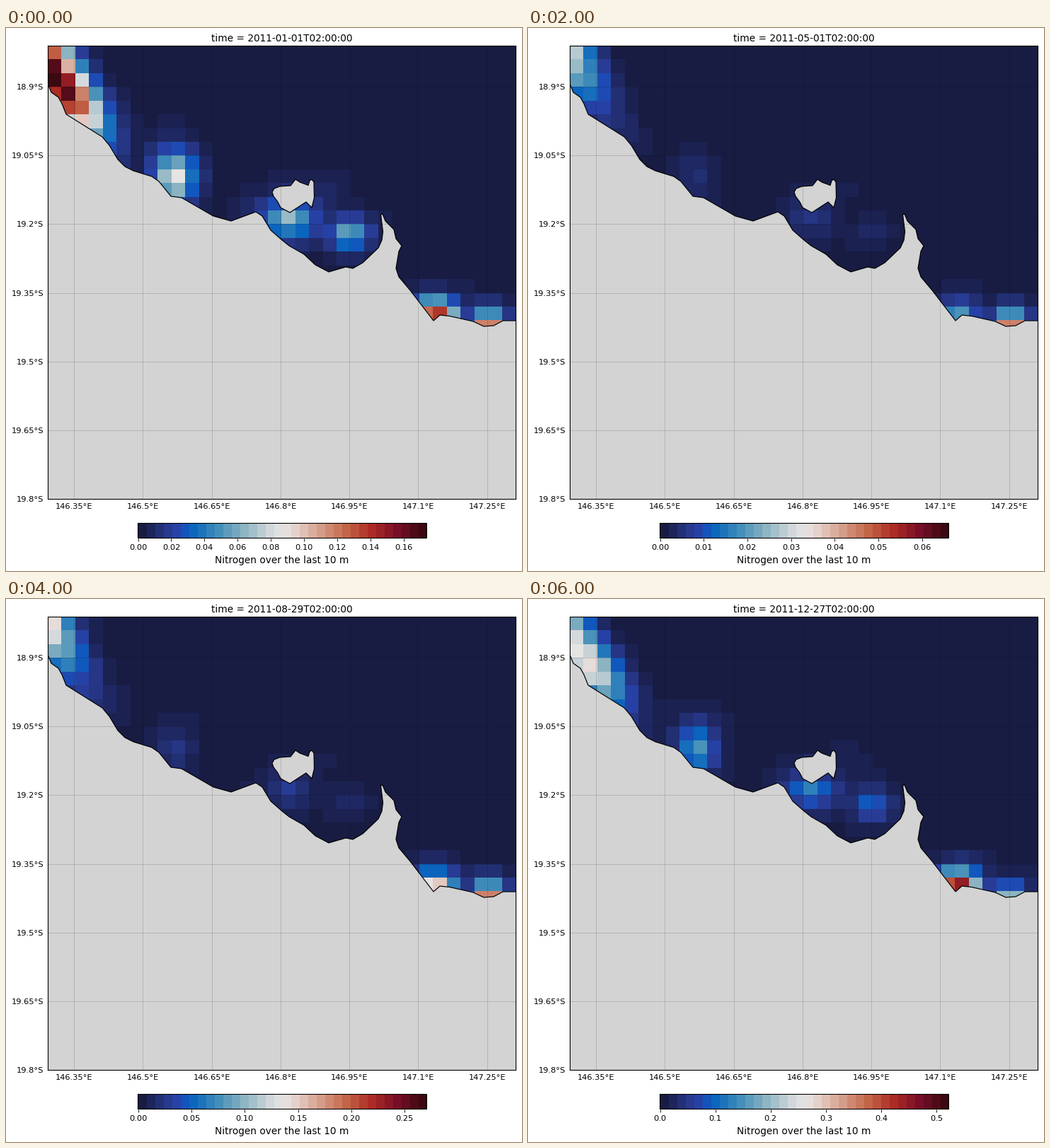
A matplotlib script that plays this animation: 729x768 px, repeating every 6.5 s.

```python
import numpy as np
import matplotlib.pyplot as plt
from matplotlib.animation import FuncAnimation
from matplotlib.colors import LinearSegmentedColormap
from matplotlib.patches import Polygon
from matplotlib.ticker import MaxNLocator

W, H, DPI = 729, 768, 96
LEFT, RIGHT, TOP, BOTTOM = 59.5, 720.5, 25.5, 666.5
ROWS, COLS = 33, 34
FRAMES, INTERVAL = 13, 500
START = np.datetime64("2011-01-01T02:00:00")

plt.rcParams["font.family"] = "DejaVu Sans"

# Diverging colour scale, positions in elevenths
STOPS = {
    0: "#181c42", 1: "#293a8f", 1.4: "#2644ac", 1.7: "#1256be", 2: "#0b66bd",
    3: "#4590b9", 4: "#8eb5c2", 5: "#d2d8db", 5.5: "#e6e5e4", 6: "#e6d2cc",
    7: "#d59d89", 8: "#c46548", 9: "#ac2b24", 10: "#780e28", 11: "#3c0911",
}
cmap = LinearSegmentedColormap.from_list(
    "balance", [(p / 11, color) for p, color in STOPS.items()], N=512)

# Outlines in stage pixels
COAST = [
    (59.5, 80), (64, 91), (74, 98), (79, 107), (85, 122), (136, 154),
    (146, 166), (158, 186), (168, 196), (180, 202), (206, 210), (216, 217),
    (233, 238), (248, 240), (293, 266), (318, 273), (353, 260), (362, 266),
    (374, 286), (390, 300), (400, 308), (421, 320), (437, 335), (456, 345),
    (480, 338), (490, 340), (504, 332), (526, 311), (531, 300), (532.5, 288),
    (529.5, 264), (532, 263), (536, 273), (548, 285), (551, 298), (559, 308),
    (555, 316), (551, 340), (555, 352), (571, 371), (604, 414), (613, 406),
    (627, 407.5), (660, 415), (675, 422), (689, 421), (702, 414), (720.5, 414),
]
ISLAND = [
    (376, 232), (379, 227), (387, 224), (402, 223), (409, 214), (415, 218),
    (427, 222.5), (429, 216), (432, 214), (435, 218), (435.5, 240), (432, 254),
    (424, 246), (401, 261), (388, 254), (384, 246), (378, 238),
]


def bump(step, peak, width):
    return np.exp(-((step - peak) / width) ** 2)


def fade(step):
    """Flush after January that dies away."""
    return np.exp(-0.8 * step)


def wet(step):
    """January flush plus the return of the rains late in the year."""
    return 1.5 * fade(step) + 0.85 * bump(step, 11.3, 2.2)


def shore(step):
    return 1 - 0.46 * (max(step - 8, 0) / 4) ** 1.5


def mouth(step):
    return 0.3 + 0.65 * fade(step) + 0.7 / (1 + np.exp(-2 * (step - 8)))


def north(step):
    level = 0.95 + 0.8 * fade(step) + 0.4 * bump(step, 9.5, 2.2)
    return level * np.sqrt(shore(step))


# Plumes: column, row, width, height, peak, strength over time
PLUMES = [
    (8.7, 9.1, 1.3, 1.7, 0.34, lambda k: 0.15 + wet(k)),
    (17, 12.1, 1.8, 1.35, 0.24, lambda k: 0.3 + 0.9 * wet(k)),
    (21.4, 13.2, 1.3, 1.1, 0.22, lambda k: 0.15 + wet(k)),
    (19.5, 9.7, 2, 1, 0.04, lambda k: 0.3 + 0.5 * wet(k)),
    (27.6, 19.3, 1.35, 1.1, 1.1, mouth),
    (31.5, 20.2, 1, 1.1, 1, shore),
]
row, col = np.mgrid[:ROWS, :COLS]


def corner(step):
    """Coastal plume: fades offshore and southward along the diagonal."""
    start, end = north(step), 1.15 * (0.2 + wet(step))
    gain = start * (end / start) ** np.minimum(row / 4, 1)
    offshore = np.exp(-((col - 0.6 * row + 1) / 2) ** 2)
    along = np.exp(-(np.maximum(row - 2, 0) / 3.7) ** 2)
    return 0.55 * gain * offshore * along


def field(step):
    grid = corner(step)
    for x, y, width, height, peak, strength in PLUMES:
        dist = np.hypot((col - x) / width, (row - y) / height)
        grid = np.maximum(grid, peak * strength(step) * np.exp(-dist ** 1.5))
    return np.round(grid / 0.02) * 0.02


def scale_max(step):
    keys = [0, 2, 4, 7, 9, 11, 12]
    tops = [0.1738, 0.0627, 0.066, 0.2348, 0.3115, 0.391, 0.5217]
    return np.exp(np.interp(step, keys, np.log(tops)))


def pt(px):
    return px * 72 / DPI


def axes_px(x0, y0, x1, y1):
    return fig.add_axes([x0 / W, 1 - y1 / H, (x1 - x0) / W, (y1 - y0) / H])


def text_px(x, y, text):
    return fig.text(x / W, 1 - y / H, text, fontsize=pt(13.65), ha="center", va="baseline")


def cells(axes, data, extent):
    return axes.imshow(data, cmap=cmap, vmin=0, vmax=1, aspect="auto",
                       interpolation="nearest", extent=extent)


fig = plt.figure(figsize=(W / DPI, H / DPI), dpi=DPI, facecolor="white")

# Map
ax = axes_px(LEFT, TOP, RIGHT, BOTTOM)
mesh = cells(ax, field(0), (LEFT, RIGHT, BOTTOM, TOP))
inland = [(RIGHT + 9, 414), (RIGHT + 9, BOTTOM + 9), (LEFT - 9, BOTTOM + 9), (LEFT - 9, 80)]
for outline in (COAST + inland, ISLAND):
    ax.add_patch(Polygon(outline, fc="lightgrey", ec="black", lw=pt(1.2),
                         joinstyle="round", zorder=2))
ax.set(xlim=(LEFT, RIGHT), ylim=(BOTTOM, TOP))

steps = np.arange(7)
lon_x = 96.2 + 97.25 * steps
lat_y = 82.8 + 97.25 * steps
ax.set_xticks(lon_x, [f"{round(146.35 + 0.15 * i, 2):g}°E" for i in steps])
ax.set_yticks(lat_y, [f"{round(18.9 + 0.15 * i, 2):g}°S" for i in steps])
ax.tick_params(length=0, pad=pt(6), labelsize=pt(11.37))
grid_style = dict(color="black", alpha=0.16, lw=pt(0.9), zorder=3)
ax.vlines(lon_x, TOP, BOTTOM, **grid_style)
ax.hlines(lat_y, LEFT, RIGHT, **grid_style)

# Colour bar
bar = axes_px(186.5, 700.5, 594, 721.5)
ramp = cells(bar, np.linspace(0, 1, 34)[None, :], (0, 1, 0, 1))
bar.set_yticks([])
bar.xaxis.set_major_locator(MaxNLocator(nbins=9, steps=[1, 2, 2.5, 5, 10]))
bar.tick_params(axis="x", length=pt(4), width=pt(0.9), pad=pt(4), labelsize=pt(11.37))
for spine in [*ax.spines.values(), *bar.spines.values()]:
    spine.set(linewidth=pt(1.1), zorder=5, snap=False)

title = text_px(390, 18.7, "")
text_px(390, 757.5, "Nitrogen over the last 10 m")


def draw(step):
    mesh.set_data(field(step))
    top = scale_max(step)
    ramp.set_extent((0, top, 0, 1))
    bar.set_xlim(0, top)
    title.set_text(f"time = {START + np.timedelta64(30 * step, 'D')}")
    return mesh, ramp, title


anim = FuncAnimation(fig, draw, frames=FRAMES, interval=INTERVAL,
                     init_func=lambda: draw(0), repeat=True, blit=False)
plt.show()
```
